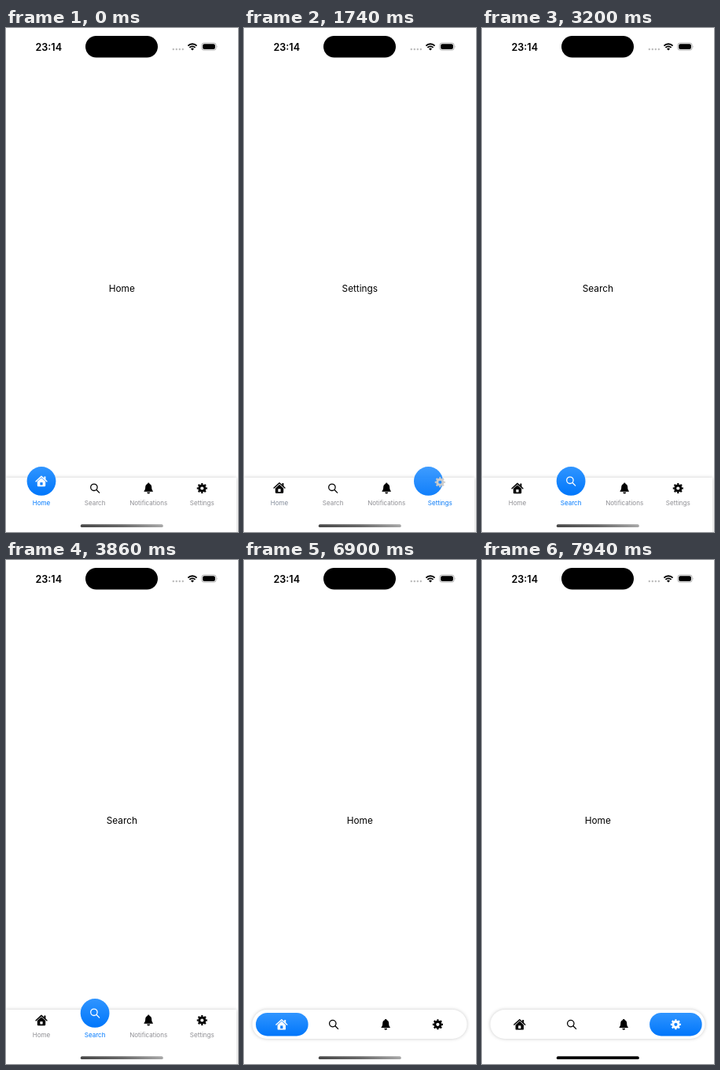
Animation, 295 px wide and 640 px high, one loop 8 s. Source, as an HTML page:

```html
<!DOCTYPE html>
<html lang="en">
<head>
<meta charset="utf-8">
<title>Tab bar</title>
<style>
  html, body { margin: 0; width: 100%; height: 100%; overflow: hidden; background: #fff; }
  svg { display: block; width: 295px; height: 640px; font-family: Inter, "Noto Sans", sans-serif; }
  text { text-anchor: middle; }
  #bar { fill: #fff; filter: drop-shadow(0 0 2.3px rgba(0, 0, 0, .22)); }
  .page { font-size: 11.8px; }
  .label { font-size: 8.05px; }
  .line { fill: none; stroke: currentColor; }
</style>
</head>
<body>
<svg viewBox="0 0 295 640">
  <defs>
    <linearGradient id="blue" x2="0" y2="1">
      <stop stop-color="#3095ff"/><stop offset="1" stop-color="#0076fb"/>
    </linearGradient>
    <linearGradient id="grey">
      <stop stop-color="#484848"/><stop offset=".5" stop-color="#686868"/><stop offset="1" stop-color="#a8a8a8"/>
    </linearGradient>
    <g id="home">
      <path class="line" stroke-width="1.5" stroke-linecap="round" stroke-linejoin="round" d="M-6.9 .2L0-6.1 6.9 .2"/>
      <path fill="currentColor" fill-rule="evenodd" d="M3.4-5.9h2v4.6l-2-1.9zM0-4.2L5.2 .6V5.6q0 1.2-1.2 1.2H-4q-1.2 0-1.2-1.2V.6zM-1.6 1.5h3.2v3.6h-3.2z"/>
    </g>
    <g id="search" class="line" stroke-width="1.3" stroke-linecap="round">
      <circle cx="-1.2" cy="-1.2" r="4.2"/><path d="M2 2L5.6 5.6"/>
    </g>
    <path id="bell" fill="currentColor" d="M-5.7 4.2C-5.7 2.6-4 2.7-4-1.4-4-4-2.7-5.1-1.4-5.5A1.4 1.4 0 0 1 1.4-5.5C2.7-5.1 4-4 4-1.4 4 2.7 5.7 2.6 5.7 4.2zM-1.9 5H1.9A1.9 1.9 0 0 1-1.9 5"/>
    <g id="gear" class="line">
      <circle r="3.6" stroke-width="3"/>
      <circle r="5.6" stroke-width="1.9" pathLength="16" stroke-dasharray="1 1" stroke-dashoffset=".5"/>
    </g>
  </defs>

  <!-- status bar -->
  <text x="54.3" y="28.5" font-size="12.6" font-weight="600">23:14</text>
  <rect x="101" y="10" width="92" height="27.5" rx="13.75"/>
  <path d="M212.8 27h12.4" stroke="#bcbcbc" stroke-width="2.4" stroke-linecap="round" stroke-dasharray="0 4"/>
  <g class="line" stroke-width="1.8">
    <path d="M231.4 22.6a7.9 7.9 0 0 1 11.2 0M233.4 24.9a5.1 5.1 0 0 1 7.2 0"/>
    <path fill="currentColor" stroke="none" d="M237 28.6l-2-2.1a2.9 2.9 0 0 1 4 0z"/>
  </g>
  <rect x="248.8" y="19" width="18.4" height="9.2" rx="3" fill="#fff" stroke="#aaa" stroke-width=".9"/>
  <rect x="250.1" y="20.3" width="15.8" height="6.6" rx="2"/>
  <path d="M268.2 22.2q1.3 1.4 0 2.8z" fill="#aaa"/>

  <g id="pages"></g>
  <rect id="bar"/>
  <g id="tabs"></g>
  <rect id="handle" x="94.8" y="630.3" width="105" height="3.7" rx="1.85"/>
</svg>
<script>
const LOOP = 8000, FLOATING_AT = 5660;
const names = ['Home', 'Search', 'Notifications', 'Settings'];
const icons = ['home', 'search', 'bell', 'gear'];
const taps = [[-2000, 0], [1400, 3], [2195, 1], [3950, 0], [6895, 3]]; // [time, tab]

const docked = {
  bar: { x: 0, y: 571, width: 293, height: 90, rx: 0 },
  mark: { y: 557, width: 36.8, height: 36.8, rx: 18.4 },
  x0: 45, step: 68.1, restY: 584.5, liftY: 575.5
};
const floating = {
  bar: { x: 10.5, y: 571, width: 273, height: 37, rx: 18.5 },
  mark: { y: 575, width: 66.6, height: 29.4, rx: 14.7 },
  x0: 47.8, step: 66.2, restY: 589.8, liftY: 589.8
};

const $ = id => document.getElementById(id);
const set = (el, attrs) => { for (const k in attrs) el.setAttribute(k, attrs[k]); return el; };
const add = (parent, tag, attrs, text = '') => {
  const el = set(document.createElementNS('http://www.w3.org/2000/svg', tag), attrs);
  el.textContent = text;
  return parent.appendChild(el);
};
const lerp = (a, b, p) => a + (b - a) * p;
const mix = (a, b, p) => `rgb(${a.map((v, i) => Math.round(lerp(v, b[i], p)))})`;
const GREY = [142, 142, 147], BLUE = [0, 122, 255], BLACK = [0, 0, 0], WHITE = [255, 255, 255];

const tabs = names.map((name, i) => {
  const g = add($('tabs'), 'g', {});
  return {
    page: add($('pages'), 'text', { class: 'page', x: 147.3, y: 335 }, name),
    mark: add(g, 'rect', { fill: 'url(#blue)' }),
    icon: add(g, 'use', { href: '#' + icons[i] }),
    label: add(g, 'text', { class: 'label', x: docked.x0 + i * docked.step, y: 605.7 }, name)
  };
});

// critically damped spring, response 0.5 s
function spring(ms) {
  const k = ms / 1000 * 4 * Math.PI;
  return 1 - (1 + k) * Math.exp(-k);
}

function draw(t) {
  const isFloating = t >= FLOATING_AT;
  const look = isFloating ? floating : docked;
  const n = taps.findLastIndex(tap => tap[0] <= t);
  const [start, to] = taps[n];
  const from = n ? taps[n - 1][1] : to;
  const p = spring(t - start);
  const fade = Math.min(1, (t - start) / 200);
  const markX = look.x0 + look.step * lerp(from, to, p) - look.mark.width / 2;

  set($('bar'), look.bar);
  set($('handle'), { fill: t > 7000 ? '#000' : 'url(#grey)' });

  tabs.forEach((tab, i) => {
    const active = i === to ? p : i === from ? 1 - p : 0;
    const lift = i === to ? p * p : active;
    const y = lerp(look.restY, look.liftY, lift);
    const shown = isFloating ? +(i === 0) : i === to ? fade : i === from ? 1 - fade : 0;
    set(tab.page, { opacity: shown });
    set(tab.mark, { ...look.mark, x: markX, opacity: active });
    set(tab.icon, {
      transform: `translate(${look.x0 + i * look.step} ${y})`,
      color: mix(BLACK, WHITE, lift ** 1.5)
    });
    set(tab.label, { fill: mix(GREY, BLUE, active), opacity: isFloating ? 0 : 1 });
  });
}

function frame() {
  draw(performance.now() % LOOP);
  requestAnimationFrame(frame);
}
frame();
</script>
</body>
</html>
```
